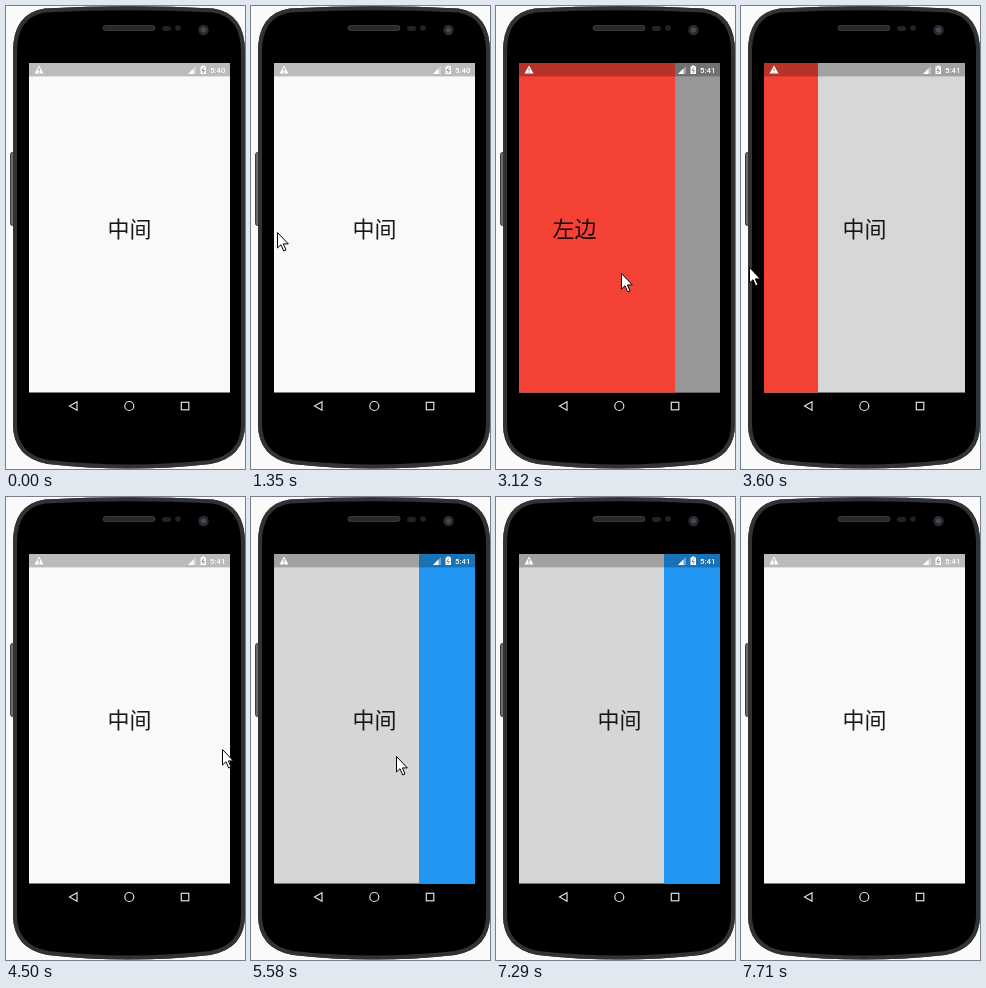
Recreate the animation shown at these times as an HTML page. Size 239 by 463 pixels, loop 8460 ms.

```html
<!DOCTYPE html>
<html lang="zh-CN">
<head>
<meta charset="utf-8">
<style>
html, body { margin: 0; width: 100%; height: 100%; overflow: hidden; background: #fafafa; }
svg { display: block; }
.label { font: 22px "Noto Sans CJK SC", "Noto Sans CJK", sans-serif; text-anchor: middle; fill-opacity: .9; }
#clock { font: 500 7.8px Roboto, sans-serif; fill: #fff; }
</style>
</head>
<body>
<svg width="239" height="463" viewBox="0 0 239 463">
  <!-- phone body: dark rim with a lighter line on it -->
  <rect x="4.500" y="146.500" width="5" height="73" rx="2" fill="#6a6c6e" stroke="#3a3c3d"/>
  <path id="body" d="M9 46Q9 9 39 4.500Q123 0 207 4.500Q237 9 237 46V418Q237 450 204 456Q123 465 42 456Q9 450 9 418Z"
        stroke="#303233" stroke-width="4"/>
  <use href="#body" style="stroke: #606364; stroke-width: 1.4"/>
  <rect x="97" y="19.500" width="52" height="5" rx="2.500" fill="#292929" stroke="#444" stroke-width=".8"/>
  <rect x="156" y="20" width="9" height="5" rx="2.500" fill="#222"/>
  <circle cx="172" cy="22" r="2.800" fill="#222"/>
  <circle cx="197.500" cy="24" r="5.200" fill="#282b30"/>
  <circle cx="197.500" cy="24" r="2.500" fill="#454b56"/>
  <g fill="none" stroke="#e0e0e0" stroke-width="1.2">
    <path d="M71 395.700V404.300L63.500 400Z"/>
    <circle cx="123.300" cy="400" r="4.500"/>
    <rect x="175.300" y="396.300" width="7.500" height="7.500"/>
  </g>

  <!-- screen -->
  <svg x="23" y="57" width="201" height="329.600" overflow="hidden">
    <rect width="201" height="330" fill="#f9f9f9"/>
    <text class="label" x="100.500" y="173.500">中间</text>
    <rect id="scrim" width="201" height="330"/>
    <g id="left">
      <rect width="201" height="330" fill="#f44336"/>
      <text class="label" x="100.500" y="173.500">左边</text>
    </g>
    <g id="right">
      <rect width="201" height="330" fill="#2196f3"/>
      <text class="label" x="100.500" y="173.500">右边</text>
    </g>
    <rect width="201" height="13.400" fill-opacity=".25"/>
    <path d="M10 2.500L14.500 10.500H5.500Z" fill="#fff"/>
    <path d="M10 5V8M10 8.700V9.700" stroke="#888"/>
    <path d="M159 11H167V3Z" fill="#fff" fill-opacity=".35"/>
    <path d="M159 11H164.500V5.500Z" fill="#fff"/>
    <path d="M171.500 3.500H173V2.500H175.500V3.500H177V11H171.500Z" fill="#fff"/>
    <path d="M174.800 4.500L173 7.500H175.500L173.800 10" fill="none" stroke="#777" stroke-width=".8"/>
    <text id="clock" x="181" y="10"></text>
  </svg>
  <path id="cursor" d="M.5 .5V16L4 12.700L6.700 19L9 18L6.400 11.900H11.300Z" fill="#fff" stroke="#000"/>
</svg>
<script>
const LOOP = 8460, STEP = 30, WIDTH = 201;
const $ = id => document.getElementById(id);

// Each move is [start, end, ...goal]; values rest between moves
const pointer = track([-20, 50], [
  [59, 60, 197, 50],        // enters at the top
  [60, 720, 27, 223],
  [870, 1170, 26, 226],
  [1350, 1830, 221, 272],   // pulls the left drawer open
  [2370, 2500, 228, 308],
  [2500, 2730, 176, 270],
  [2910, 3690, -14, 260],   // pushes it shut
  [3750, 4200, 216, 252],
  [4500, 4800, 219, 253],
  [5320, 5580, 145, 259],   // pulls the right drawer open
  [5580, 6130, -14, 259],
  [6380, 7260, 166, 264],   // pushes it shut
  [7260, 7290, -20, 264]
]);
const leftDrawer = track([0], [
  [1400, 1830, 175], [1830, 1920, WIDTH], [2910, 3640, 45], [3640, 4200, 0]
]);
const rightDrawer = track([0], [
  [5395, 6060, WIDTH], [6550, 7260, 60], [7260, 7710, 0]
]);

function track(rest, moves) {
  return t => moves.reduce((at, [start, end, ...goal]) => {
    const p = Math.min(1, Math.max(0, (t - start) / (end - start)));
    return at.map((v, i) => v + (goal[i] - v) * p);
  }, rest);
}

function place(id, x, y) {
  $(id).setAttribute("transform", `translate(${Math.round(x)} ${Math.round(y)})`);
}

function draw(now) {
  const t = Math.floor(now % LOOP / STEP) * STEP;
  const [left] = leftDrawer(t), [right] = rightDrawer(t);
  place("left", left - WIDTH, 0);
  place("right", WIDTH - right, 0);
  place("cursor", ...pointer(t));
  $("scrim").setAttribute("fill-opacity", 0.51 * Math.max(left, right) / WIDTH);
  $("clock").textContent = t < 2910 ? "5:40" : "5:41";
}

const start = performance.now();
function tick() {
  draw(performance.now() - start);
  requestAnimationFrame(tick);
}
tick();
</script>
</body>
</html>
```
